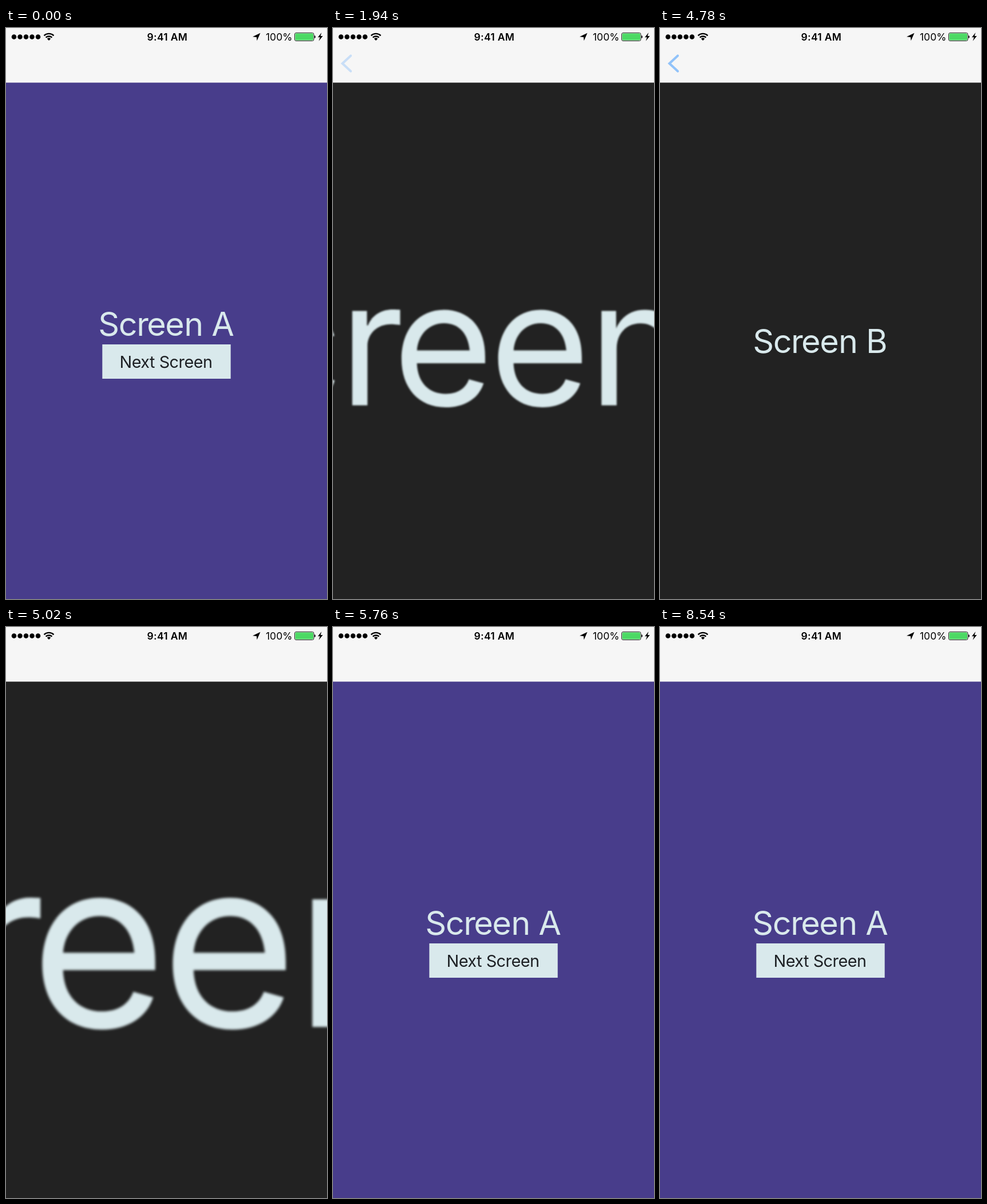
These frames come from a looping animation (561x998 px, 8700 ms). An HTML page:

```html
<!DOCTYPE html>
<html lang="en">
<head>
<meta charset="utf-8">
<title>Screen transition</title>
<style>
  html, body { margin: 0; width: 100%; height: 100%; overflow: hidden; }
  svg { display: block; width: 100vw; height: 100vh; font-family: Inter, sans-serif; }
  .title { font-size: 57.5px; letter-spacing: -1.4px; fill: #d9e9ec; text-anchor: middle; }
  .label { font-size: 28.8px; letter-spacing: -.5px; fill: #1d2024; text-anchor: middle; }
  .status { font-size: 17.5px; }
</style>
</head>
<body>
<svg viewBox="0 0 561 998">
  <g id="screenA">
    <rect y="95" width="561" height="903" fill="#483d8b"/>
    <text class="title" x="279.4" y="538.4" dx="0 0 0 -1.4 0 .7 .7">Screen A</text>
    <g id="button">
      <rect x="168.3" y="553" width="224.4" height="60" fill="#d9e9ec"/>
      <text class="label" x="279.5" y="594">Next Screen</text>
    </g>
  </g>
  <g id="screenB">
    <rect y="95" width="561" height="903" fill="#222"/>
    <text id="titleB" class="title" x="279.2" y="568.4" dx="0 0 0 -1.4 0 .7 .7">Screen B</text>
  </g>

  <rect width="561" height="95.5" fill="#f6f6f6"/>
  <path id="back" d="M31 48.5 16.5 62 31 75.5" fill="none" stroke="#007aff" stroke-width="4.1" stroke-linecap="round"/>

  <path d="M14 15.5h42.2" stroke="#000" stroke-width="8.6" stroke-linecap="round" stroke-dasharray="0 10.5"/>
  <g fill="none" stroke="#000" stroke-width="2.3">
    <path d="M66.5 13.3a12.4 12.4 0 0 1 17 0"/>
    <path d="M69.6 16.6a8 8 0 0 1 10.8 0"/>
  </g>
  <path d="M71.8 18.7a4.8 4.8 0 0 1 6.4 0L75 22z"/>
  <text class="status" x="246.6" y="21.7" font-weight="600" letter-spacing=".3">9:41 AM</text>
  <path d="M444.5 8.8 438.6 22.3 437.9 16 431 15.2z"/>
  <text class="status" x="454" y="21.7">100%</text>
  <rect x="504.5" y="8.5" width="33.5" height="14" rx="2.5" fill="#fff" stroke="#222"/>
  <rect x="505.5" y="9.5" width="31.5" height="12" rx="1.5" fill="#4cd964"/>
  <path d="M539 13c2.4 0 2.4 5 0 5z"/>
  <path d="M551.5 8 545 16.3h3.8L546.6 22.8 553.7 14h-4z"/>
</svg>
<script>
  const LOOP = 8700, DURATION = 750, MAX_SCALE = 10, PRESSED = .2;
  const PUSH = 1813, POP = 4836, POP_VISIBLE = 4880, POP_END = 5760;
  const el = id => document.getElementById(id);
  const button = el('button'), screenB = el('screenB'), titleB = el('titleB'), back = el('back');

  const clamp = v => Math.min(1, Math.max(0, v));
  const inOutQuad = u => u < .5 ? 2 * u * u : 1 - 2 * (1 - u) ** 2;
  const outQuart = u => 1 - (1 - u) ** 4;
  const ramp = (t, start, length, ease) => ease(clamp((t - start) / length));

  // Opacity of a touchable that dims on press and recovers on release
  const touch = (t, press, fade, release) =>
    1 - (1 - PRESSED) * (ramp(t, press, fade, inOutQuad) - ramp(t, release, 250, inOutQuad));

  function draw(t) {
    const pop = t < POP_VISIBLE ? 0 : ramp(t, POP, DURATION, outQuart);
    const position = ramp(t, PUSH, DURATION, outQuart) - pop;
    const scale = MAX_SCALE + (1 - MAX_SCALE) * position;

    button.style.opacity = touch(t, 1270, 110, 1700);
    screenB.style.display = t >= PUSH && t < POP_END ? '' : 'none';
    screenB.setAttribute('transform', `translate(280.5 547) scale(${scale}) translate(-280.5 -547)`);
    titleB.style.filter = scale > 1.05 ? 'blur(.28px)' : 'none';
    back.style.opacity = clamp((position - .42) / .58) * touch(t, 4350, 130, 4690);
  }

  function tick() {
    draw(performance.now() % LOOP);
    requestAnimationFrame(tick);
  }
  tick();
</script>
</body>
</html>
```
